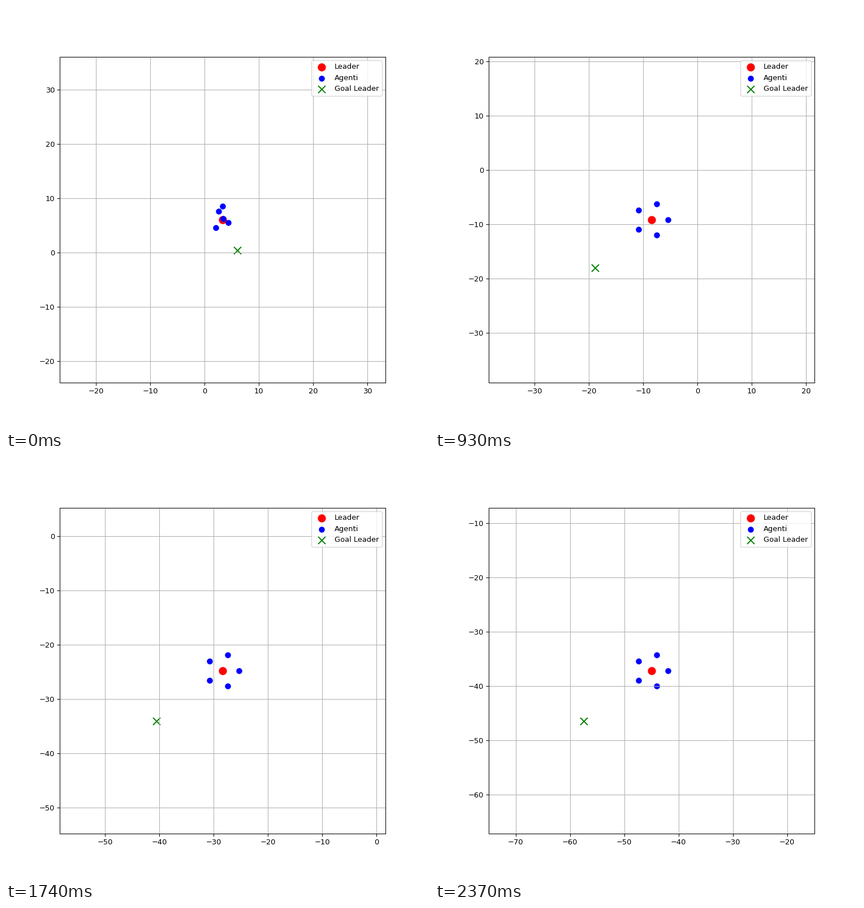
Write a matplotlib script that moves like this. It is 748 px wide and 748 px high and loops after 2400 ms.

```python
import numpy as np
import matplotlib.pyplot as plt
from matplotlib.animation import FuncAnimation

FRAMES = 80
INTERVAL = 30
VIEW = 30

GOAL_START = np.array([6.03, 0.4])
GOAL_STEP = np.array([-0.8037, -0.5935])
GAP_START = np.array([2.65, -5.68])     # goal minus leader
GAP_STEADY = np.array([-12.65, -9.36])
LEADER_DECAY = 0.939

RADIUS = 3
AGENT_DECAY = 0.75
ANGLES = 2 * np.pi * np.arange(5) / 5
FORMATION = RADIUS * np.column_stack([np.cos(ANGLES), np.sin(ANGLES)])
AGENTS_START = np.array([
    [0.03, 0.17], [0.0, 2.5], [-0.78, 1.54], [-1.25, -1.5], [0.97, -0.6],
])


def positions(n):
    """Leader, agents and goal after n steps."""
    goal = GOAL_START + GOAL_STEP * n
    gap = GAP_STEADY + (GAP_START - GAP_STEADY) * LEADER_DECAY ** n
    leader = goal - gap
    offsets = FORMATION + (AGENTS_START - FORMATION) * AGENT_DECAY ** n
    return leader, leader + offsets, goal


fig, ax = plt.subplots(figsize=(8, 8), dpi=93.5)
ax.set_aspect("equal")
ax.grid(True)

leader_dot = ax.scatter([], [], s=100, c="red", label="Leader")
agent_dots = ax.scatter([], [], s=50, c="blue", label="Agenti")
goal_mark = ax.scatter([], [], s=100, c="green", marker="x", label="Goal Leader")
ax.legend(loc="upper right")


def update(n):
    leader, agents, goal = positions(n)
    leader_dot.set_offsets([leader])
    agent_dots.set_offsets(agents)
    goal_mark.set_offsets([goal])
    ax.set_xlim(leader[0] - VIEW, leader[0] + VIEW)
    ax.set_ylim(leader[1] - VIEW, leader[1] + VIEW)
    return leader_dot, agent_dots, goal_mark


anim = FuncAnimation(fig, update, frames=FRAMES, init_func=lambda: update(0),
                     interval=INTERVAL, repeat=True, repeat_delay=0)
plt.show()
```
